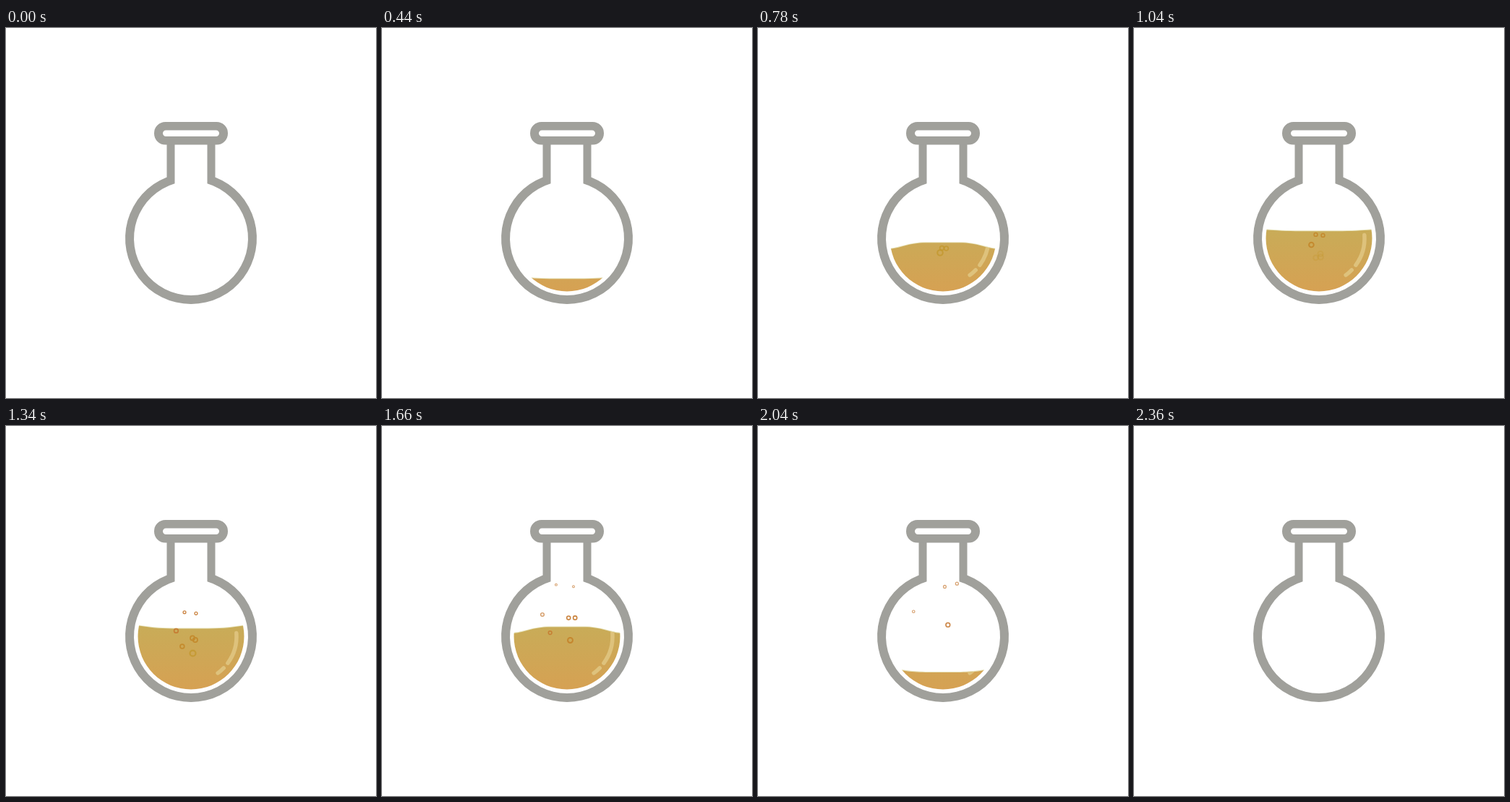
Write an HTML page with a canvas that moves like this. It is 512 by 512 pixels and loops after 2.7 s.

```html
<!DOCTYPE html>
<html lang="en">
<head>
<meta charset="utf-8">
<title>Flask</title>
<style>
  html, body { margin: 0; height: 100%; overflow: hidden; background: #fff; }
  canvas { display: block; width: 100vmin; height: 100vmin; }
</style>
</head>
<body>
<canvas width="512" height="512"></canvas>
<script>
const ctx = document.querySelector('canvas').getContext('2d');
const LOOP = 2700, STEP = 20, START = 200, END = 2360;
const CX = 256, CY = 291, TAU = Math.PI * 2;

const bulb = new Path2D('M222.5 160V206.4A91 91 0 1 0 289.5 206.4V160H278.5V215.3A79 79 0 1 1 233.5 215.3V160Z');
const lip = new Path2D();
lip.roundRect(205, 130, 102, 31.5, 15.5);
lip.roundRect(217, 141.5, 78, 8.5, 4.2);
const inside = new Path2D();
inside.arc(CX, CY, 73.5, 0, TAU);

const tint = ctx.createLinearGradient(0, 275, 0, 365);
tint.addColorStop(0, '#c8ac58');
tint.addColorStop(1, '#d6a153');

// time and place of birth, speed, acceleration, sideways drift per pixel of rise, radius
const bubbles = [
  { t: 780, x: 254.5, y: 304.5, v: .061, a: 6.6e-4, drift: -.16, r: 3.7 },
  { t: 780, x: 260.5, y: 305, v: .0595, a: 6.6e-4, drift: .054, r: 3.7 },
  { t: 780, x: 252, y: 311, v: .036, a: 6.6e-4, drift: -.6, r: 4.8 },
  { t: 1110, x: 258, y: 308.7, v: .0575, a: 6.6e-4, drift: .005, r: 4.4 },
  { t: 1110, x: 259, y: 312.7, v: .063, a: 6.6e-4, drift: .173, r: 4.5 },
  { t: 1110, x: 250, y: 315.3, v: .039, a: 6.6e-4, drift: -.594, r: 4.2 },
  { t: 1340, x: 258.5, y: 314.5, v: .0562, a: 0, drift: .11, r: 5.1 }
];

const clamp = n => Math.min(1, Math.max(0, n));
const mix = (a, b, p) => a + (b - a) * p;
const ease = (t, from, to) => (1 - Math.cos(Math.PI * clamp((t - from) / (to - from)))) / 2;

function surface(level, bump) {
  const edge = level + bump / 2, mid = level - bump / 2;
  const bend = edge + Math.max(0, -bump) * .5;
  const p = new Path2D();
  p.moveTo(176, edge);
  p.bezierCurveTo(196, bend, 206, mid, 232, mid);
  p.lineTo(280, mid);
  p.bezierCurveTo(306, mid, 316, bend, 336, edge);
  return p;
}

function shine(from, to) {
  ctx.beginPath();
  ctx.arc(CX, CY, 63, from, to);
  ctx.stroke();
}

function drawLiquid(t) {
  const level = 364 - 86 * (ease(t, 120, 1140) - ease(t, 1540, 2340));
  const bump = .5 + 8.5 * Math.cos(TAU * (t - 765) / 900);
  const top = surface(level, bump);
  const body = new Path2D(top);
  body.lineTo(336, 370);
  body.lineTo(176, 370);
  body.closePath();

  ctx.save();
  ctx.clip(inside);
  ctx.strokeStyle = '#e6e1b6';
  ctx.lineWidth = 2;
  ctx.stroke(top);
  ctx.fillStyle = tint;
  ctx.fill(body);
  ctx.clip(body);
  ctx.strokeStyle = '#dec27c';
  ctx.lineWidth = 5.5;
  ctx.lineCap = 'round';
  shine(-.07, .63);
  shine(.77, .94);
  ctx.restore();
}

function drawBubble(b, t) {
  const age = t - b.t;
  if (age < -110 || age > 1150) return;
  const rise = b.v * (age + b.a * age * age);
  const r = b.r - age * .002;
  const warm = clamp(age / 600);
  const line = .3 + r * .38;
  ctx.globalAlpha = clamp((age + 110) / 150) * (1 - .6 * Math.max(0, age / 1150) ** 3);
  ctx.strokeStyle = `rgb(${mix(194, 198, warm)}, ${mix(150, 120, warm)}, ${mix(42, 50, warm)})`;
  ctx.lineWidth = line;
  ctx.beginPath();
  ctx.arc(b.x + b.drift * rise, b.y - rise, r - line / 2, 0, TAU);
  ctx.stroke();
  ctx.globalAlpha = 1;
}

function draw(now) {
  const t = Math.floor(now % LOOP / STEP) * STEP;
  ctx.fillStyle = '#fff';
  ctx.fillRect(0, 0, 512, 512);
  if (t >= START && t < END) {
    drawLiquid(t);
    bubbles.forEach(b => drawBubble(b, t));
  }
  ctx.fillStyle = '#a0a09b';
  ctx.fill(bulb);
  ctx.fill(lip, 'evenodd');
}

let start;
function tick(now) {
  start ??= now;
  draw(now - start);
  requestAnimationFrame(tick);
}
draw(0);
requestAnimationFrame(tick);
</script>
</body>
</html>
```
